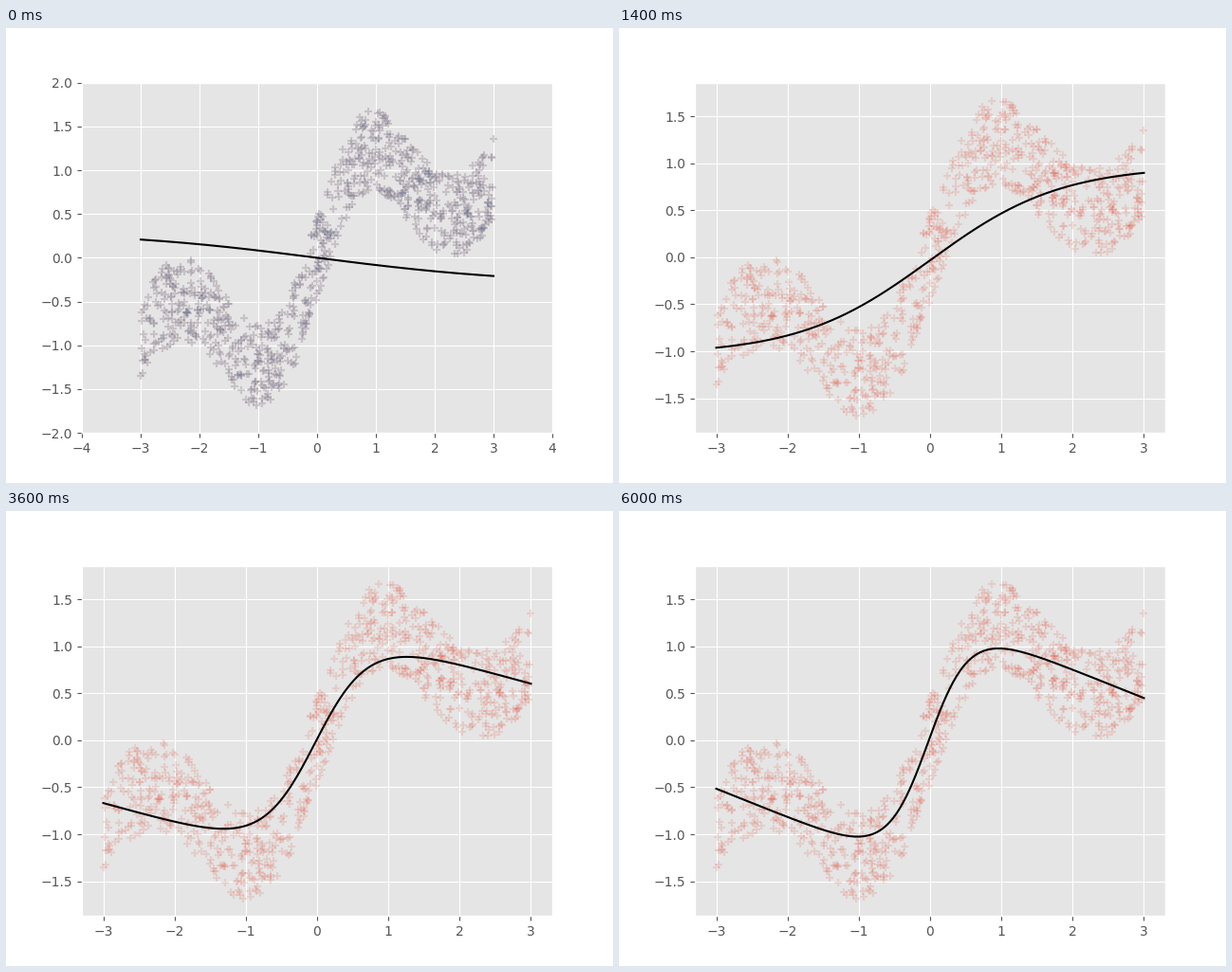
Recreate the animation shown at these times as a matplotlib script. Size 640 px wide and 480 px high, loop 6.2 s.

```python
import numpy as np
import matplotlib.pyplot as plt
from matplotlib.animation import FuncAnimation

FRAMES, INTERVAL = 31, 200
N = 900
SPREAD = 0.47
RED, BLUE = "#E24A33", "#348ABD"

plt.style.use("ggplot")
rng = np.random.default_rng(4)


def trend(x):
    return (0.325 * x + 0.41 * np.sin(x) + 0.61 * np.sin(2 * x)
            + 0.05 * np.sin(3 * x))


# Noisy samples, with both ends of the range always present
px = np.sort(rng.uniform(-3, 3, N))
noise = rng.uniform(-SPREAD, SPREAD, N)
px[0], px[-1] = -3, 3
noise[0], noise[-1] = -SPREAD, SPREAD
py = trend(px) + noise

x = np.linspace(-3, 3, 400)


def fit(step):
    """Learned curve: a sigmoid that steepens while its tails tilt back."""
    steep = 0.16 + 1.6 / (1 + np.exp((13 - step) / 5.2))
    bend = max(steep - 0.54, 0)
    swing = 1.23 * np.exp(-(step / 3.6) ** 2) * np.cos(0.7 * step)
    gain = 1.013 + 0.33 * (steep - 0.54) - swing
    tilt = -0.29 * bend + 0.024 * bend**2
    offset = -0.032 * (1 - np.exp(-step / 2))
    t = np.tanh(steep * x)
    return gain * t + tilt * x + offset + 0.06 * bend * (1 - t**2)


fig, ax = plt.subplots(figsize=(6.4, 4.8), dpi=100)
style = dict(marker="+", s=36, alpha=0.16)
ax.scatter(px, py, color=RED, **style)
overlay = ax.scatter(px, py, color=BLUE, **style)
line, = ax.plot(x, fit(0), color="black", lw=1.5)


def draw(step):
    first = step == 0
    overlay.set_visible(first)
    if first:
        ax.axis((-4, 4, -2, 2))
    else:
        ax.axis((-3.3, 3.3, -1.8703, 1.8617))
    line.set_ydata(fit(step))
    return overlay, line


anim = FuncAnimation(fig, draw, frames=FRAMES, interval=INTERVAL,
                     repeat=True, repeat_delay=0, blit=False)
plt.show()
```
